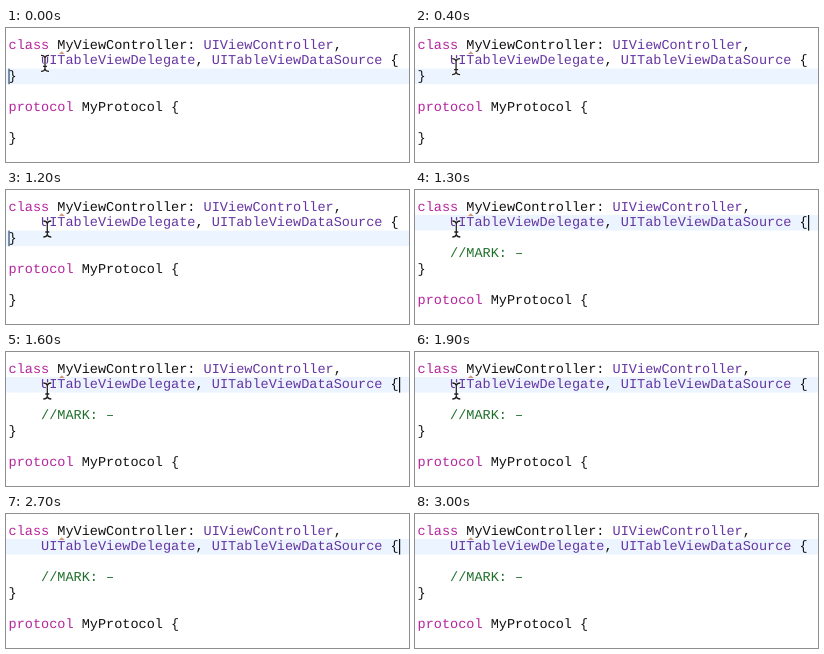
Recreate the animation shown at these times as an HTML page. Size 403 by 134 pixels, loop 3.1 s.

```html
<!DOCTYPE html>
<html lang="en">
<head>
<meta charset="utf-8">
<title>Code editor</title>
<style>
html, body { margin: 0; width: 100%; height: 100%; overflow: hidden; background: #fff; }
svg { display: block; width: 403px; height: 134px; }
text { font: 13.55px "Liberation Mono", monospace; white-space: pre; text-rendering: geometricPrecision; }
</style>
</head>
<body>
<svg viewBox="0 0 403 134">
  <rect width="403" height="134" fill="#fff"/>
  <rect id="band" width="403" height="15.6" fill="#ecf5ff"/>
  <g id="code"></g>
  <path d="M53 26L55.8 23.2L58.6 26Z" fill="#d09a78"/>
  <rect id="caret" width="1.2" height="15.6"/>
  <g id="beam" fill="none">
    <path id="halo" stroke="#fff" stroke-width="2.8"/>
    <path id="bar" stroke="#222" stroke-width="1.3"/>
  </g>
</svg>
<script>
const LOOP = 3100, INSERT = 1300, HIDE = 2700, BLINK = 560;
const LEFT = 2.5, COL = 8.13, TOP = 9.4, ROW = 15.6, BASE = 11.1;
const KEY = '#b5259d', TYPE = '#6535a3', PLAIN = '#111', NOTE = '#1f6f2b';
const $ = id => document.getElementById(id);
const NS = 'http://www.w3.org/2000/svg';

// Each run: row, column, text, colour
const head = [
  [0, 0, 'class', KEY], [0, 6, 'MyViewController:', PLAIN],
  [0, 24, 'UIViewController', TYPE], [0, 40, ',', PLAIN],
  [1, 4, 'UITableViewDelegate', TYPE], [1, 23, ',', PLAIN],
  [1, 25, 'UITableViewDataSource', TYPE], [1, 47, '{', PLAIN]
];
const note = [[3, 4, '//MARK: –', NOTE]];
const tail = [
  [2, 0, '}', PLAIN], [4, 0, 'protocol', KEY],
  [4, 9, 'MyProtocol {', PLAIN], [6, 0, '}', PLAIN]
];

function addGroup(runs) {
  const g = document.createElementNS(NS, 'g');
  for (const [row, col, str, fill] of runs) {
    const t = document.createElementNS(NS, 'text');
    t.setAttribute('x', LEFT + col * COL);
    t.setAttribute('y', TOP + row * ROW + BASE);
    t.setAttribute('fill', fill);
    t.textContent = str;
    g.appendChild(t);
  }
  $('code').appendChild(g);
  return g;
}
addGroup(head);
const noteGroup = addGroup(note), tailGroup = addGroup(tail);

const shape = 'M-4 -8Q-0.5 -8 0 -5.5Q0.5 -8 4 -8M0 -5.5V5.5M-4 8Q-0.5 8 0 5.5Q0.5 8 4 8M-2 3H2';
$('halo').setAttribute('d', shape);
$('bar').setAttribute('d', shape);

const show = (el, on) => el.setAttribute('visibility', on ? 'visible' : 'hidden');
const ease = p => p * p * (3 - 2 * p);

function draw(t) {
  const inserted = t >= INSERT;
  const row = inserted ? 1 : 2;
  const y = TOP + row * ROW;
  $('band').setAttribute('y', y);
  $('caret').setAttribute('y', y);
  $('caret').setAttribute('x', inserted ? 393 : 2.4);
  $('caret').setAttribute('fill', inserted ? '#111' : '#2c4a70');
  const lit = inserted ? Math.floor((t - INSERT) / BLINK) % 2 === 0 : t < 100 || t >= 660;
  show($('caret'), lit);

  show(noteGroup, inserted);
  tailGroup.setAttribute('transform', `translate(0 ${inserted ? 2 * ROW : 0})`);

  const p = ease(Math.min(1, Math.max(0, t / 500)));
  $('beam').setAttribute('transform', `translate(${39 + 2.3 * p} ${35.3 + 3.7 * p})`);
  show($('beam'), t < HIDE);
}

const start = performance.now();
function tick() {
  draw((performance.now() - start) % LOOP);
  requestAnimationFrame(tick);
}
tick();
</script>
</body>
</html>
```
